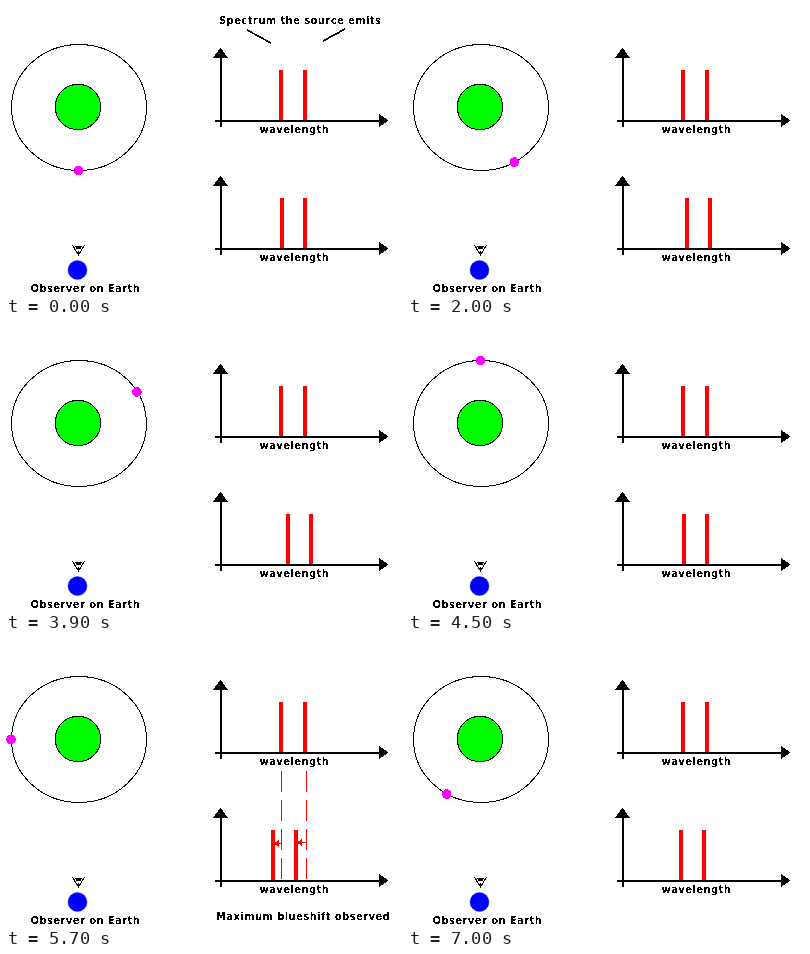
An HTML page that plays this animation: 396x288 px, repeating every 7300 ms.

```html
<!DOCTYPE html>
<html lang="en">
<head>
<meta charset="utf-8">
<title>Doppler shift of an orbiting source</title>
<style>
  html, body { margin: 0; width: 100%; height: 100%; overflow: hidden; background: #fff; }
  svg { display: block; width: 396px; height: 288px; shape-rendering: crispEdges; }
  text { font: bold 10px "DejaVu Sans", sans-serif; letter-spacing: .4px; filter: url(#hard); }
  .ink { fill: none; stroke: #000; }
  .bold { stroke-width: 2; }
  .pointer { stroke-width: 1.7; }
  .shift { fill: none; stroke: #f00; }
  .head { fill: #f00; }
</style>
</head>
<body>
<svg viewBox="0 0 396 288">
  <defs>
    <!-- Removes the soft edges of the letters -->
    <filter id="hard">
      <feComponentTransfer><feFuncA type="discrete" tableValues="0 1"/></feComponentTransfer>
    </filter>
    <g id="axes">
      <path class="ink bold" d="M215 50V121M209 115H374"/>
      <path d="M214.5 41.5L222 52H207ZM382.5 114.5L373 108V121Z"/>
      <text x="253.5" y="127">wavelength</text>
    </g>
    <path id="guides" class="shift" stroke-dasharray="21 8" d="M275.5 241V131M300.5 241V131"/>
  </defs>

  <ellipse class="ink" cx="73" cy="101.5" rx="67.5" ry="63"/>
  <circle cx="72" cy="101" r="22.7" fill="#0f0" stroke="#000"/>
  <circle id="planet" r="4.8" fill="#f0f"/>

  <path class="ink" d="M66.5 239.5L72.5 249L78.5 239M67.5 241.5Q72.5 239 77.5 241.5"/>
  <path d="M70 241h5v2h-5zM72 245h1v4h-1z"/>
  <circle cx="71.5" cy="264" r="9.5" fill="#00f" stroke="#00f" stroke-opacity=".35" shape-rendering="auto"/>
  <text x="24.5" y="286">Observer on Earth</text>

  <path fill="#f00" d="M273 64h4v50h-4zM297 64h4v50h-4z"/>
  <use href="#axes"/>
  <path id="seen" fill="#f00" d="M274 192h4v50h-4zM297 192h4v50h-4z"/>
  <use href="#axes" y="128"/>

  <g id="emits">
    <text x="213" y="18">Spectrum the source emits</text>
    <path class="ink pointer" d="M241 24L265 37M339 23L317 35"/>
  </g>
  <g id="sees">
    <text x="212" y="161">Spectrum the observer sees</text>
    <path class="ink pointer" d="M246 165L266 176M355 166L333 176"/>
  </g>
  <g id="red">
    <use href="#guides"/>
    <path class="shift" d="M276 199.5H282M301 200.5H305"/>
    <path class="head" d="M279 196L284 199.5L279 203ZM302 197L307 200.5L302 204Z"/>
    <text x="212" y="282">Maximum redshift observed</text>
  </g>
  <g id="blue">
    <use href="#guides"/>
    <path class="shift" d="M275 205.5H270M300 204.5H293"/>
    <path class="head" d="M273 202L268 205.5L273 209ZM296 201L291 204.5L296 208Z"/>
    <text x="210" y="282">Maximum blueshift observed</text>
  </g>
</svg>
<script>
  const STOPS = 12, STEP = 300, HOLD = 1000, MAX_SHIFT = 9;
  const $ = id => document.getElementById(id);
  const notes = { 0: ["emits", "sees"], 3: ["red"], 9: ["blue"] };
  const noteIds = Object.values(notes).flat();

  // Each stop lasts one step, followed by its notes; the first has notes only.
  const scenes = [];
  let loop = 0;
  function addScene(stop, length, note) {
    scenes.push({ start: loop, stop, note });
    loop += length;
  }
  for (let stop = 0; stop < STOPS; stop++) {
    if (stop) addScene(stop, STEP);
    for (const note of notes[stop] || []) addScene(stop, HOLD, note);
  }

  const move = (id, x, y) => $(id).setAttribute("transform", `translate(${x} ${y})`);

  function draw(time) {
    const t = time % loop;
    const { stop, note } = scenes.findLast(s => s.start <= t);
    const angle = stop / STOPS * 2 * Math.PI;
    move("planet", 72.5 + 67.5 * Math.sin(angle), 101.5 + 63 * Math.cos(angle));
    // A triangle wave: red when receding, blue when approaching.
    const wave = Math.asin(Math.sin(angle)) / (Math.PI / 2);
    move("seen", Math.round(MAX_SHIFT * wave), 0);
    for (const id of noteIds) $(id).style.display = id === note ? "" : "none";
  }

  const start = performance.now();
  function tick() {
    draw(performance.now() - start);
    requestAnimationFrame(tick);
  }
  tick();
</script>
</body>
</html>
```
